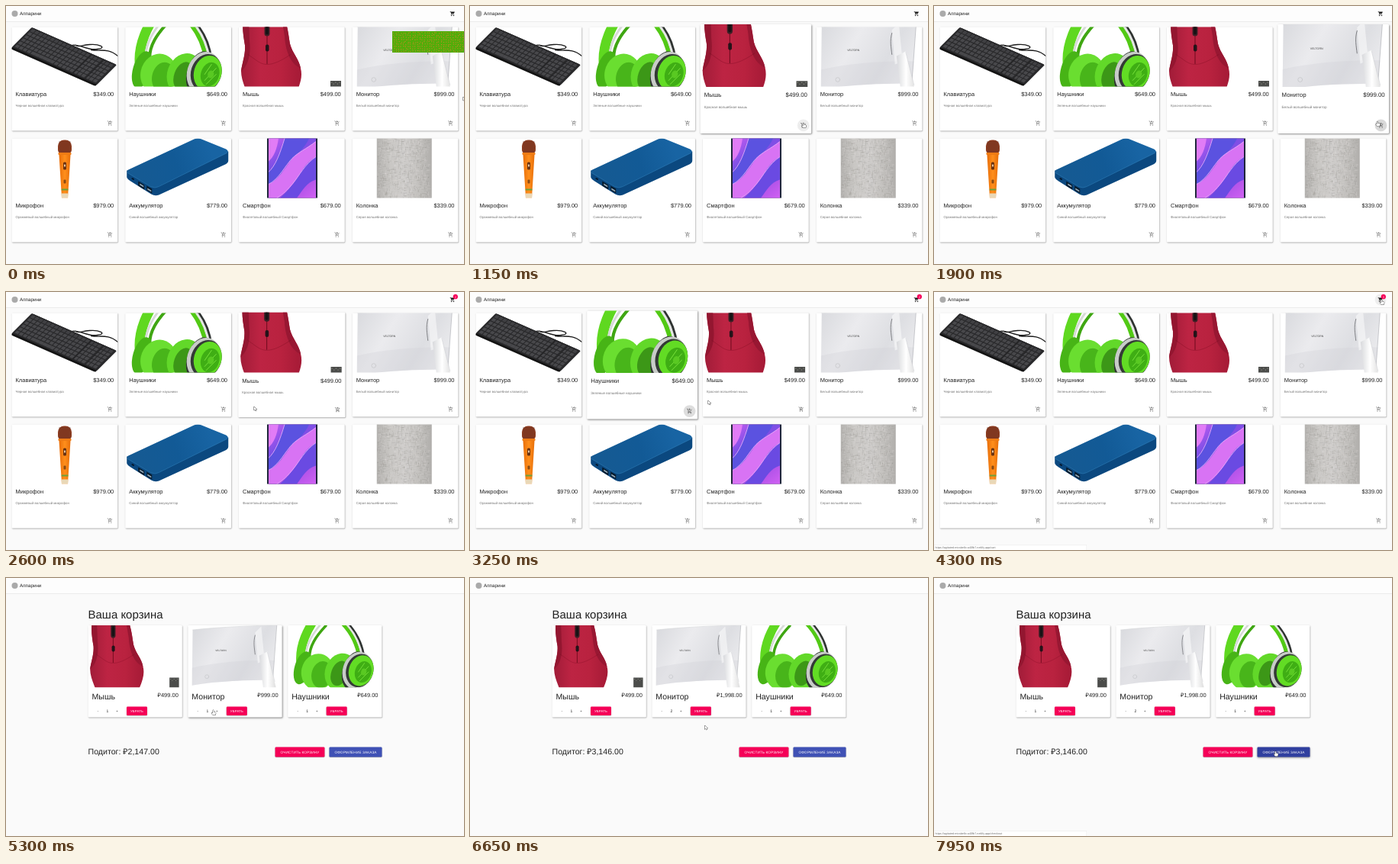
An HTML page with a canvas for the animation above (8 s loop, 600 px wide and 338 px high).

```html
<!DOCTYPE html>
<html lang="ru">
<head>
<meta charset="utf-8">
<title>Магазин</title>
<style>
html, body { margin: 0; width: 100%; height: 100%; overflow: hidden; background: #fafafa; }
canvas { display: block; width: 600px; height: 338px; }
</style>
</head>
<body>
<canvas id="stage"></canvas>
<script>
const W = 600, H = 338, LOOP = 8000, CART_AT = 4400;
const canvas = document.getElementById('stage');
const c = canvas.getContext('2d');
const dpr = window.devicePixelRatio || 1;
canvas.width = W * dpr;
canvas.height = H * dpr;

const INK = 'rgba(0,0,0,.87)', SOFT = 'rgba(0,0,0,.54)';
const PINK = '#f50057', BLUE = '#3f51b5', BLUE_DARK = '#303f9f';
const MEDIA_W = 138.75, MEDIA_H = 78;

const CART_FULL = new Path2D('M1 2h3.3l.9 2H20c.9 0 1.2.8.9 1.5l-3.6 6.5c-.3.6-1 1-1.8 1H8.1l-1.1 2h12v2H7c-1.7 0-2.5-1.6-1.8-3l1.4-2.4L3 4H1z');
const CART_ADD = new Path2D('M1 2h3.3l4.2 9h7l3.9-7 1.7 1-3.9 7c-.3.6-1 1-1.7 1H8.1L7 15h12v2H7c-1.7 0-2.5-1.6-1.8-3l1.4-2.4L3 4H1zM11 9h2V6h3V4h-3V1h-2v3H8v2h3z');
const ARROW = new Path2D('M0 0V6.2L1.5 4.9L2.5 7.1L3.5 6.7L2.5 4.5H4.5Z');
const HAND = new Path2D('M-.7 .6Q0-.5.7.6V3L3.3 3.5Q4.2 3.8 4 5L3.4 8H-.7L-2.6 5.1Q-2.7 4-1.7 4.3L-.7 5.1Z');

const products = [
  ['Клавиатура', 349, 'Черная волшебная клавиатура', keyboard],
  ['Наушники', 649, 'Зеленые волшебные наушники', headphones],
  ['Мышь', 499, 'Красная волшебная мышь', mouse],
  ['Монитор', 999, 'Белый волшебный монитор', monitor],
  ['Микрофон', 979, 'Оранжевый волшебный микрофон', microphone],
  ['Аккумулятор', 779, 'Синий волшебный аккумулятор', powerBank],
  ['Смартфон', 679, 'Фиолетовый волшебный Смартфон', phone],
  ['Колонка', 339, 'Серая волшебная колонка', speaker]
].map(([name, price, note, draw], i) => ({
  name, price, note, draw,
  box: { x: 7.5 + (i % 4) * 148.75, y: 27.5 + (i >> 2) * 146, w: MEDIA_W, h: 136 }
}));
const basket = [2, 3, 1].map((id, i) => ({
  ...products[id],
  box: { x: 107.5 + i * 130.83, y: 62, w: 123.33, h: 120.5 }
}));
const checkout = { x: 423.5, y: 221.4, w: 69, h: 13.1 };
const clearAll = { x: 352.6, y: 221.4, w: 64.8, h: 13.1 };

// time, x, y
const route = [
  [0, 599, 119], [300, 599, 119], [650, 520, 125], [950, 437, 153], [1250, 437, 153],
  [1650, 581, 151], [1950, 581, 151], [2050, 572, 190], [2250, 545, 190], [2400, 470, 168],
  [2550, 450, 165], [2600, 325, 150], [2900, 287, 153], [3215, 287, 153], [3250, 312, 142],
  [3600, 540, 90], [4050, 586.5, 10], [4400, 586.5, 10], [4500, 495, 55], [5100, 271.5, 173],
  [6250, 271.5, 173], [6850, 320, 200], [7000, 320, 200], [7500, 447.5, 227], [8000, 447.5, 227]
];
const clicks = [1200, 1850, 3130, 7880];

const clamp = v => Math.max(0, Math.min(1, v));
const smooth = v => { v = clamp(v); return v * v * (3 - 2 * v); };
const money = n => n.toLocaleString('en-US', { minimumFractionDigits: 2 });
const inBox = (p, b) => p.x >= b.x && p.x <= b.x + b.w && p.y >= b.y && p.y <= b.y + b.h;
const near = (p, x, y, r) => Math.hypot(p.x - x, p.y - y) < r;

function pointer(t) {
  t = Math.max(0, t);
  let i = 1;
  while (i < route.length - 1 && route[i][0] < t) i++;
  const [t0, x0, y0] = route[i - 1], [t1, x1, y1] = route[i];
  const k = smooth((t - t0) / (t1 - t0));
  return { x: x0 + (x1 - x0) * k, y: y0 + (y1 - y0) * k };
}

// Share of the last 200 ms spent over a box
function lift(t, box) {
  let n = 0;
  for (let i = 0; i < 10; i++) n += inBox(pointer(t - i * 20), box);
  return smooth(n / 10);
}

function press(t) {
  return Math.max(0, ...clicks.map(k => t >= k ? 1 - (t - k) / 400 : 0));
}

function random(seed) {
  return () => (seed = (seed * 16807) % 2147483647) / 2147483647;
}

function text(s, x, y, size, color = INK, align = 'left', spacing = 0) {
  c.font = `${size}px "Liberation Sans", Arial, sans-serif`;
  c.textRendering = 'geometricPrecision';
  c.letterSpacing = spacing + 'px';
  c.textAlign = align;
  c.fillStyle = color;
  c.fillText(s, x, y);
}

function rect(x, y, w, h, color, r = 0) {
  c.beginPath();
  c.roundRect(x, y, w, h, r);
  c.fillStyle = color;
  c.fill();
}

function oval(x, y, rx, ry, color, turn = 0) {
  c.beginPath();
  c.ellipse(x, y, rx, ry, turn, 0, Math.PI * 2);
  c.fillStyle = color;
  c.fill();
}

const fill = (d, color) => { c.fillStyle = color; c.fill(new Path2D(d)); };

function line(d, color, width) {
  c.strokeStyle = color;
  c.lineWidth = width;
  c.lineCap = 'round';
  c.stroke(new Path2D(d));
}

function blend(x0, y0, x1, y1, ...colors) {
  const g = c.createLinearGradient(x0, y0, x1, y1);
  colors.forEach((k, i) => g.addColorStop(i / (colors.length - 1), k));
  return g;
}

function shaded(draw, dx, dy, blur, alpha) {
  c.save();
  c.shadowColor = `rgba(0,0,0,${alpha})`;
  c.shadowOffsetX = dx * dpr;
  c.shadowOffsetY = dy * dpr;
  c.shadowBlur = blur * dpr;
  draw();
  c.restore();
}

function icon(path, x, y, size, color) {
  c.save();
  c.translate(x - size / 2, y - size / 2);
  c.scale(size / 24, size / 24);
  c.fillStyle = color;
  c.fill(path);
  oval(7, 20, 2, 2, color);
  oval(17, 20, 2, 2, color);
  c.restore();
}

// Pictures, drawn in a 138.75 x 78 field
function keyboard() {
  line('M78 24C88 21 98 31 112 29S114 22 102 23S88 27 84 24M104 30C116 32 126 27 139 38', '#1c1c1c', 1.3);
  c.save();
  c.transform(111, 49, -26, 26, 26.5, .5);
  rect(0, 0, 1, 1.08, '#141414', .03);
  rect(0, 0, 1, 1, '#29292b', .03);
  for (let row = 0; row < 6; row++) {
    for (let k = 0; k < 21; k++) {
      const space = row === 5 && k > 3 && k < 9;
      rect(.018 + k * .046, .05 + row * .155, space ? .046 : .037, .12, row ? '#48484b' : '#404043', .008);
    }
  }
  rect(.705, .03, .012, .95, '#232325');
  rect(.848, .03, .012, .95, '#232325');
  c.restore();
}

function headphones() {
  line('M19 48C17 24 28-2 46-24', '#5fd820', 13);
  line('M27 44C25 24 37 4 52-12', '#d7dad7', 3);
  line('M32 40C32 24 41 10 56-6', '#3fa612', 4);
  line('M76-14C92 0 102 18 106 42', '#52c915', 6);
  line('M84-14C100 2 110 20 112 42', '#303432', 4);
  line('M81-14C98 2 107 20 110 42', '#e4e6e4', 3);
  oval(22, 56, 12, 25, '#47b416', .28);
  oval(44, 62, 24, 27, '#6ade30', .2);
  oval(50, 66, 15, 20, '#48b51a', .2);
  oval(78, 62, 23, 28, '#62d829', .35);
  oval(76, 64, 12, 19, '#3c9717', .35);
  oval(98, 60, 17, 29, '#303532', .3);
  oval(103, 60, 22, 28, '#c8ccc8', .3);
  oval(106, 60, 20, 25, '#343a36', .3);
  oval(108, 60, 18, 23, '#62dc24', .3);
  oval(111, 62, 12, 16, '#3fae14', .3);
  line('M104 70L119 54M106 75L119 62M104 62L113 49', '#86ef45', .8);
  oval(112, 62, 4, 5, '#59c922', .3);
}

function mouse() {
  fill('M6-12C4 0 6 12 8 24C9 36 4 48 3 58C3 66 6 74 9 82L13 92H73C80 76 84 66 81 54C79 42 70 34 67 22C65 10 64 0 60-12Z',
    blend(2, 0, 82, 0, '#a01c38', '#bd2443', '#b9223f', '#a51a36'));
  fill('M6-12C4 0 6 12 8 24C9 36 4 48 3 58C13 50 16 34 14 18L13-12Z', '#931630');
  fill('M60-12C64 0 65 10 67 22C70 34 79 42 81 54C67 48 61 30 60 12L56-12Z', '#981732');
  line('M12 36C24 44 28 49 37 49S56 44 68 36', 'rgba(105,5,24,.4)', .7);
  line('M37-10V48', '#6f0b1e', 1);
  rect(33.5, -8, 7, 20, '#3d2026', 3.5);
  rect(35, -5, 4, 15, '#171315', 2);
  rect(35, 23, 4.5, 9, '#241319', 2);
  rect(120, 70.5, 14, 17, '#4b4c4a');
  for (let i = 0; i < 5; i++) rect(121 + i * 2.6, 72 + i % 2 * 2, 1.2, 1.2, '#85877d');
}

function monitor() {
  fill('M7 0C45-4 88-6 131-7L125 74C88 74 44 75 6 82Z',
    blend(6, 0, 130, 72, '#d9dade', '#ebebee', '#dddee2', '#f0f0f2'));
  fill('M6 56C44 47 92 44 128 45L125 74C88 74 44 75 6 82Z', 'rgba(205,206,211,.3)');
  line('M7 0C45-4 88-6 131-7', '#d2d3d6', .6);
  line('M131-7L125 74', '#bcbdc2', .8);
  fill('M99 4L108-5L113 45L103 49Z', 'rgba(255,255,255,.5)');
  line('M99 8C96 18 98 27 99 36', '#66676b', .8);
  fill('M105 38L117 32L130 86H111Z', blend(105, 0, 130, 0, '#d8d9dc', '#fff', '#ddd'));
  line('M117 33L128 76', '#ced0d3', .6);
  c.beginPath();
  c.arc(28, 69, 2.8, 0, Math.PI * 2);
  c.strokeStyle = '#c4c5c8';
  c.lineWidth = .7;
  c.stroke();
  text('VELTORN', 48.5, 31, 3.5, '#444', 'center');
}

function microphone() {
  fill('M62 21H77L73.5 78H65.5Z', blend(61, 0, 78, 0, '#e56a08', '#ff8f1c', '#e46a07'));
  rect(60.5, 2, 18, 18, '#8d3d22', [8, 8, 5, 5]);
  for (let y = 4; y < 19; y += 2) {
    for (let x = 62 + y % 4 / 2; x < 77; x += 2) rect(x, y, .9, .9, '#532419');
  }
  rect(61, 18.5, 17, 3, '#ef7c14', 1);
  rect(67.5, 31, 4, 10, '#6a3211', 1.5);
  rect(68.5, 34, 2, 3, '#e8c6a2', .5);
  rect(68, 54, 3, 5, '#8a4b14', 1);
  rect(65.3, 66, 8.6, 2, '#6ca13d');
  rect(65.3, 72, 8.4, 6, '#e9d8b7');
}

function powerBank() {
  fill('M2 42V51Q3 54 7 56L34 73Q39 76 44 74L131 34Q135 32 135 29V17Z', '#0b487f');
  fill('M4 41L90 1Q95-1 100 1L132 14Q137 17 132 20L44 63Q39 66 33 63L4 46Q1 43 4 41Z',
    blend(20, 45, 110, 10, '#155a93', '#125a96', '#1864a3'));
  line('M3 45L33 63Q39 66 44 63L133 19', '#2c79b3', .6);
  fill('M17 56L25 61V67L17 62ZM28 62L35 66V72L28 68Z', '#071a2b');
  fill('M19 59L24 62V64L19 61ZM29 65L34 68V70L29 67Z', '#8fa7b8');
  oval(10, 53, 2, 1.2, '#061c32', .5);
}

function phone() {
  rect(37, -8, 66, 94, '#20263c', 5);
  c.save();
  c.beginPath();
  c.rect(39, -8, 62, 94);
  c.clip();
  rect(39, -8, 62, 94, blend(39, 0, 101, 78, '#c45cf0', '#7a4fe6', '#a34ce4', '#d061f2'));
  fill('M60 0H92C82 22 62 28 56 46C52 60 46 66 39 70V44C48 36 54 20 60 0Z', '#5b52e0');
  fill('M39 60C52 54 60 40 70 26C78 18 88 14 101 4V24C86 34 80 48 70 60C64 68 56 74 50 78H39Z', '#d873f4');
  fill('M101 24V54C88 58 84 68 76 78H54C68 66 78 50 84 40C88 34 94 28 101 24Z', '#6a4ae2');
  fill('M39 0H52C50 14 46 24 39 30Z', '#e17cf6');
  line('M60 0C54 20 48 36 39 44M101 4C88 14 78 18 70 26S52 54 39 60M101 24C86 34 80 48 70 60S56 74 50 78', '#f0b4fb', .8);
  c.restore();
}

function speaker() {
  rect(32, -8, 72, 95, blend(32, 0, 104, 0, '#b4b2af', '#c9c7c4', '#cecccA', '#c3c1be', '#b0aeab'), 6);
  const rnd = random(71);
  for (let i = 0; i < 900; i++) {
    const len = 1 + rnd() * 4, across = rnd() < .5;
    rect(32.5 + rnd() * 67, rnd() * 78, across ? len : .5, across ? .5 : len,
      rnd() < .5 ? 'rgba(95,91,88,.2)' : 'rgba(245,244,242,.25)');
  }
}

function picture(draw, w, h) {
  c.save();
  c.beginPath();
  c.rect(0, 0, w, h);
  c.clip();
  c.translate(0, h / 2);
  c.scale(w / MEDIA_W, w / MEDIA_W);
  c.translate(0, -MEDIA_H / 2);
  draw();
  c.restore();
}

function surface(w, h, up) {
  shaded(() => rect(0, 0, w, h, '#fff', 1.2), .5 + .3 * up, .7 + .2 * up, 1.6 + .6 * up, .36 + .14 * up);
}

const addSpot = b => [b.x + b.w - 10, b.y + b.h - 10];

function shopCard(item, up, t) {
  const { x, y, w, h } = item.box;
  const s = 1 + .05 * up;
  const over = near(pointer(t - 30), ...addSpot(item.box), 8);
  c.save();
  c.translate(x + w / 2, y + h / 2);
  c.scale(s, s);
  c.translate(-w / 2, -h / 2);
  surface(w, h, up);
  picture(item.draw, w, MEDIA_H);
  text(item.name, 5, 90.8, 7.5);
  text('$' + money(item.price), w - 5, 90.8, 7.5, INK, 'right');
  text(item.note, 5, 104.9, 4.375, SOFT);
  if (over) oval(w - 10, h - 10, 7.5, 7.5, `rgba(0,0,0,${.07 + .09 * press(t)})`);
  icon(CART_ADD, w - 10, h - 10, 7.5, SOFT);
  c.restore();
}

function header(t) {
  rect(0, 0, W, 20, '#fdfdfd');
  rect(0, 20, W, .5, '#dedede');
  oval(11.5, 10, 4, 4, '#aaa');
  text('Аппарини', 18, 12.2, 6.25);
  if (t >= CART_AT) return;
  if (near(pointer(t), 585, 10, 7.5)) oval(585, 10, 7.5, 7.5, 'rgba(0,0,0,.06)');
  icon(CART_FULL, 585, 10, 7.5, INK);
  const count = t < 2050 ? 0 : t < 2500 ? 1 : t < 3800 ? 2 : 3;
  if (!count) return;
  const r = 3.1 * smooth((t - 2050) / 200);
  oval(588.8, 6.2, r, r, PINK);
  if (r > 2) text(count, 588.8, 7.5, 3.75, '#fff', 'center');
}

function shop(t) {
  products.map(item => ({ item, up: lift(t, item.box) }))
    .sort((a, b) => a.up - b.up)
    .forEach(({ item, up }) => shopCard(item, up, t));
}

function button(b, label, size, color, up = 0) {
  shaded(() => rect(b.x, b.y, b.w, b.h, color, 1.25), 0, .6 + .5 * up, 1.2 + 1.4 * up, .35 + .1 * up);
  text(label, b.x + b.w / 2, b.y + b.h / 2 + size * .35, size, '#fff', 'center', size * .0286);
}

function cart(t) {
  const doubled = t >= 6050;
  text('Ваша корзина', 107.5, 53, 15);
  basket.forEach((item, i) => {
    const { x, y, w, h } = item.box;
    const count = i === 1 && doubled ? 2 : 1;
    c.save();
    c.translate(x, y);
    surface(w, h, lift(t, item.box));
    picture(item.draw, w, 81.25);
    text(item.name, 5, 96.6, 10.625);
    text('₽' + money(item.price * count), w - 5, 93.8, 7.5, INK, 'right');
    text('-', 13, 113.5, 4.375, INK, 'center');
    text(count, 25.5, 113.7, 5, INK, 'center');
    text('+', 38, 113.5, 4.375, INK, 'center');
    button({ x: 50.5, y: 106.6, w: 27, h: 11.4 }, 'УБРАТЬ', 4.375, PINK);
    c.restore();
  });
  text('Подитог: ₽' + money(doubled ? 3146 : 2147), 107.5, 231.3, 10.625);
  button(clearAll, 'ОЧИСТИТЬ КОРЗИНУ', 4.69, PINK);
  const over = inBox(pointer(t), checkout);
  button(checkout, 'ОФОРМЛЕНИЕ ЗАКАЗА', 4.69, over ? BLUE_DARK : BLUE, over ? .6 + .4 * press(t) : 0);
}

function status(t) {
  const page = t >= 4150 && t < 4600 ? 'cart' : t >= 7500 ? 'checkout' : '';
  if (!page) return;
  rect(-1, 331, 201, 8, '#e6e6e6', 1);
  rect(-1, 331.4, 200.6, 8, '#fff', 1);
  text('https://agitated-mirabello-a40fb7.netlify.app/' + page, 1.5, 336.2, 3.75, '#707070');
}

function notice(t) {
  if (t >= 150) return;
  const x = 506 + (t < 50 ? 0 : 94 * smooth((t - 20) / 130));
  rect(x, 33, 94, 28, '#50ad09');
  const rnd = random(19);
  for (let row = 0; row < 9; row++) {
    for (let k = 0; k < 30; k++) {
      rect(x + 1 + k * 3.1 + rnd() * 1.5, 34 + row * 3 + rnd() * 1.3, 1.1, 1.1, '#cf8728');
    }
  }
}

function clickable(p, t) {
  if (t < CART_AT) return near(p, 585, 10, 7.5) || products.some(i => near(p, ...addSpot(i.box), 7.5));
  const step = basket.some(({ box: b }) => inBox(p, { x: b.x + 8, y: b.y + 106, w: 70, h: 12 }));
  return step || inBox(p, checkout) || inBox(p, clearAll);
}

function cursor(t) {
  const p = pointer(t);
  const shape = clickable(p, t) ? HAND : ARROW;
  c.save();
  c.translate(p.x, p.y);
  c.scale(.82, .82);
  c.lineJoin = 'round';
  c.strokeStyle = '#222';
  c.lineWidth = 1;
  c.stroke(shape);
  c.fillStyle = '#fff';
  c.fill(shape);
  c.restore();
}

function frame(now) {
  const t = now % LOOP;
  c.setTransform(dpr, 0, 0, dpr, 0, 0);
  rect(0, 0, W, H, '#fafafa');
  header(t);
  (t < CART_AT ? shop : cart)(t);
  status(t);
  notice(t);
  cursor(t);
}

const start = performance.now();
function tick() {
  frame(performance.now() - start);
  requestAnimationFrame(tick);
}
tick();
</script>
</body>
</html>
```
